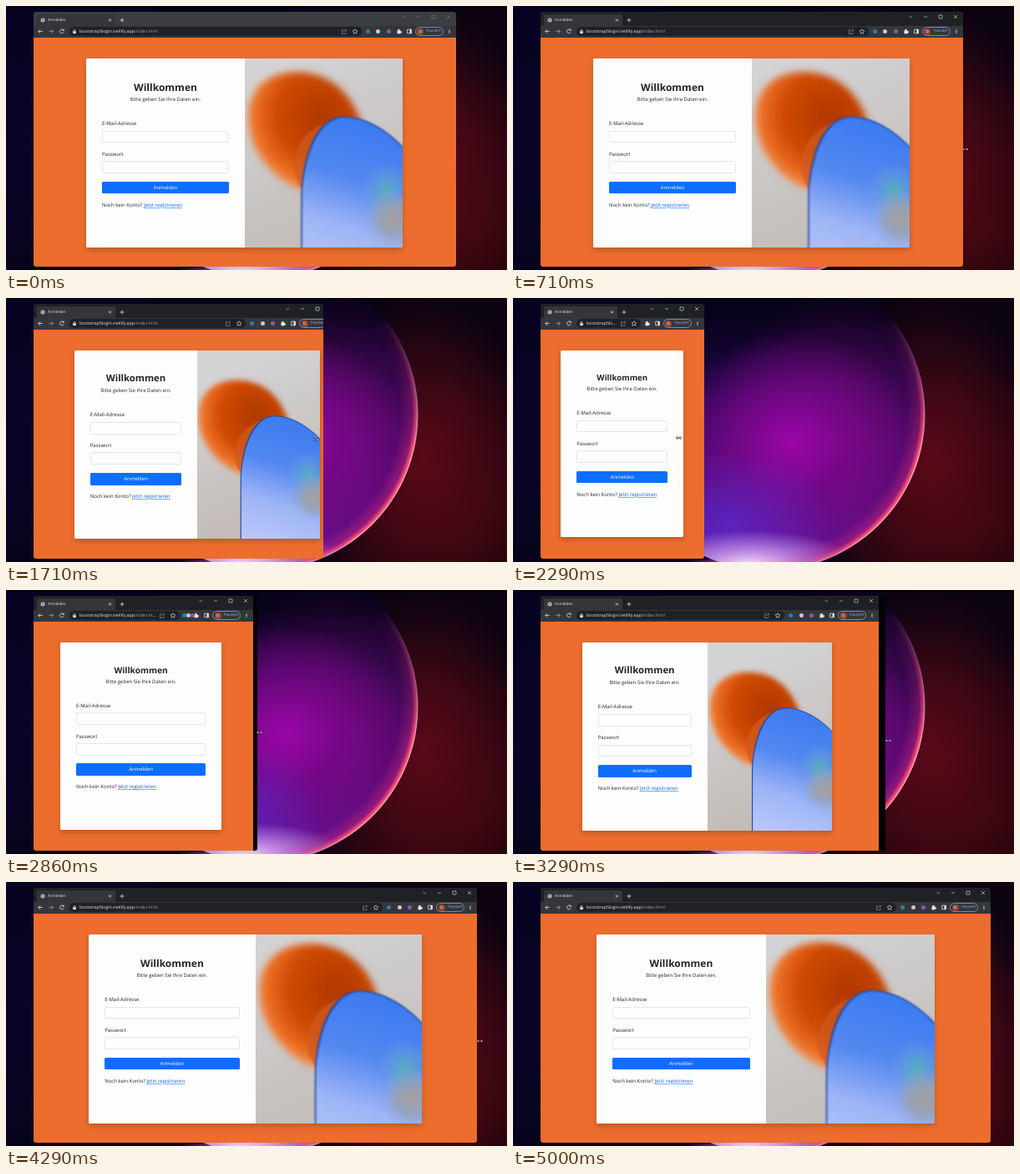
Write an HTML page that moves like this. It is 600 px wide and 317 px high and loops after 5570 ms.

```html
<!DOCTYPE html>
<html lang="de">
<head>
<meta charset="utf-8">
<title>Anmelden</title>
<style>
  /* Right edges of window frame, browser bar and page layout; pointer x */
  @property --w { syntax: "<length>"; inherits: true; initial-value: 538px; }
  @property --c { syntax: "<length>"; inherits: true; initial-value: 538px; }
  @property --p { syntax: "<length>"; inherits: true; initial-value: 538px; }
  @property --m { syntax: "<length>"; inherits: true; initial-value: 650px; }

  * { box-sizing: border-box; margin: 0; }
  html, body { width: 100%; height: 100%; overflow: hidden; }
  body {
    position: relative;
    font: 6px/9.4px "Open Sans", "Noto Sans", sans-serif;
    text-rendering: geometricPrecision;
    color: #212529;
    white-space: nowrap;
    background:
      radial-gradient(90px 9px at 292px 319px, #e9b8f5, #8a3ac0a0 65%, #3a106000),
      radial-gradient(140px 190px at 500px 190px, #6e0a1cc0, #560a16a0 45%, #2a051200 100%),
      radial-gradient(260px 190px at 560px 270px, #40060ac0, #20040800),
      linear-gradient(90deg, #08032400 40%, #0b0310 80%),
      linear-gradient(#060220, #0a0428 60%, #08031c);
    animation: resize 5570ms step-end infinite;
  }
  svg { position: absolute; overflow: visible; }
  .bar svg { fill: none; stroke: #dfe1e5; stroke-width: .8; }

  .planet, .rim {
    position: absolute; left: 120px; top: -47px;
    width: 374px; height: 374px; border-radius: 50%;
  }
  .planet {
    background:
      radial-gradient(130px 42px at 165px 368px, #fff0fff0, #d9a8f5b0 45%, #a050e000),
      radial-gradient(130px 90px at 140px 320px, #5a30dca0, #5a30dc00),
      radial-gradient(150px 130px at 215px 220px, #9a06a8, #7c078fc0 45%, #50066c00),
      radial-gradient(160px 170px at 270px 210px, #780a6cb0, #4a065000),
      linear-gradient(#060219 18%, #1c0541 38%, #42096c 62%, #6a1298);
  }
  .rim {
    background: radial-gradient(closest-side, #e0307000 88%, #e8307860 96%, #ff5078 98.6%, #ffb49a 99.4%, #ff508000);
    mask-image: radial-gradient(200px 220px at 340px 290px, #000 30%, #0000);
  }

  .win {
    position: absolute; left: 33px; top: 7px;
    width: calc(var(--w) - 33px); height: 306px;
    border-radius: 3px; overflow: hidden; background: #030205;
  }
  .bar {
    position: absolute; width: calc(var(--c) - 33px); height: 31px;
    container: bar / inline-size;
    background: #202124 linear-gradient(#0000 17px, #35363a 17px);
    color: #e8eaed;
    animation: wake 5570ms step-end infinite;
  }
  .tab {
    position: absolute; left: 4px; top: 3px;
    width: min(94px, calc(var(--c) - 141px)); height: 14px;
    padding-left: 13px; border-radius: 3px 3px 0 0;
    background: #35363a; font-size: 4.5px; line-height: 14px;
  }
  .tab svg { left: 100%; top: 0; }
  .omni {
    position: absolute; left: 43px; right: 113px; top: 18px; height: 11px;
    padding: 0 27px 0 12px; border-radius: 6px;
    background: #202124; font-size: 5.25px; line-height: 11px;
  }
  .omni p { overflow: hidden; text-overflow: ellipsis; }
  .omni i { font-style: normal; color: #9aa0a6; }
  .omni svg { left: 100%; top: 0; }
  .right { left: 100%; top: 0; }
  .caps { animation: focus 5570ms step-end infinite; }
  .ext { position: absolute; right: 78px; top: 21px; width: 30px; display: flex; justify-content: space-between; }
  .ext b { flex: none; width: 5px; height: 5px; border-radius: 50%; background: #2b83a4; }
  .ext b:nth-child(2) { background: #c9cacd; }
  .ext b:nth-child(3) { background: #9552b4; }
  .pill {
    position: absolute; right: 15px; top: 18px; width: 34px; height: 11px;
    padding-left: 13px; border: .7px solid #7389b4; border-radius: 6px;
    color: #8ab4f8; font-size: 4.5px; line-height: 9.6px;
  }
  .pill b {
    position: absolute; left: 1.6px; top: .9px; width: 8px; height: 8px;
    border-radius: 50%; background: #9c4630; color: #fff;
    font-weight: 400; line-height: 8px; text-align: center;
  }
  @container bar (max-width: 300px) {
    .omni { right: 88px; }
    .ext { right: 73px; width: 12px; }
  }
  @container bar (max-width: 225px) {
    .omni { right: 76px; }
    .ext { display: none; }
  }

  .desk { position: absolute; top: 31px; width: calc(var(--c) - 33px); height: 275px; background: #ec6d2d; }
  .page { width: calc(var(--p) - 33px); height: 275px; container: page / inline-size; }
  .card {
    position: absolute; left: 12.5cqw; top: 25px; width: 75cqw;
    display: flex; border-radius: 1.5px; overflow: hidden;
    background: #fdfdfe; box-shadow: 0 3px 6px #0003;
  }
  .form { width: 100%; padding: 27px 18.75px 45.8px; }
  h1 { font-size: min(12px, 7.95px + .864cqw); line-height: 1.25; text-align: center; margin-bottom: 3.1px; }
  .sub { text-align: center; margin-bottom: 19.6px; }
  label { display: block; margin-bottom: 3.1px; }
  .field, .btn { height: 14.84px; margin-bottom: 9.4px; border-radius: 1.6px; }
  .field { border: 1px solid #e3e6ea; }
  .btn { background: #0d6efd; color: #fff; text-align: center; line-height: 14.84px; }
  u { color: #0d5fe8; text-decoration-color: #0d6efd90; text-decoration-thickness: .5px; }
  .art { display: none; width: 50%; position: relative; overflow: hidden; }
  .art svg { width: 100%; height: 100%; overflow: hidden; }
  @container page (min-width: 387px) {
    .form { width: 50%; }
    .art { display: block; }
  }

  .mouse {
    left: calc(var(--m) - 4.5px); top: 169px; width: 9px; height: 6px;
    animation: drift 5570ms linear infinite;
  }

  @keyframes wake { 0% { background-color: #3b3d41; } 12.74%, 100% { background-color: #202124; } }
  @keyframes focus { 0% { opacity: .4; } 12.74%, 100% { opacity: 1; } }
  @keyframes drift {
    0%, 23.15% { top: 169px; }
    41.11% { top: 165px; }
    51.34% { top: 168px; }
    64.09% { top: 185px; }
    77.01%, 100% { top: 188px; }
  }
  @keyframes resize {
    0%     { --w: 538.6px; --c: 538.6px; --p: 538.6px; --m: 650px; }
    12.74% { --w: 538.6px; --c: 538.6px; --p: 538.6px; --m: 541px; }
    17.95% { --w: 538px; --c: 538px; --p: 538.6px; --m: 537px; }
    20.46% { --w: 531px; --c: 534px; --p: 538.6px; --m: 527px; }
    23.15% { --w: 515px; --c: 521px; --p: 538.6px; --m: 511px; }
    25.67% { --w: 488px; --c: 500px; --p: 510px; --m: 480px; }
    28.18% { --w: 442px; --c: 458px; --p: 480px; --m: 432px; }
    30.7%  { --w: 380px; --c: 400px; --p: 425px; --m: 370px; }
    33.39% { --w: 315px; --c: 335px; --p: 360px; --m: 305px; }
    35.9%  { --w: 262px; --c: 275px; --p: 300px; --m: 252px; }
    38.42% { --w: 230px; --c: 236px; --p: 250px; --m: 215px; }
    41.11% { --w: 228.5px; --c: 228.5px; --p: 228.5px; --m: 198px; }
    46.14% { --w: 228.5px; --c: 228.5px; --p: 228.5px; --m: 210px; }
    48.65% { --w: 246px; --c: 240px; --p: 236px; --m: 249px; }
    51.34% { --w: 301px; --c: 296px; --p: 290px; --m: 303px; }
    53.85% { --w: 350px; --c: 342px; --p: 335px; --m: 353px; }
    56.37% { --w: 400px; --c: 390px; --p: 376px; --m: 403px; }
    59.06% { --w: 446px; --c: 438px; --p: 432px; --m: 449px; }
    61.57% { --w: 489px; --c: 483px; --p: 480px; --m: 492px; }
    64.09% { --w: 519px; --c: 514.5px; --p: 514.5px; --m: 522px; }
    66.6%  { --w: 537px; --c: 533px; --p: 533px; --m: 540px; }
    69.29% { --w: 548px; --c: 545px; --p: 545px; --m: 551px; }
    71.81% { --w: 555px; --c: 553px; --p: 553px; --m: 558px; }
    74.32% { --w: 560px; --c: 559px; --p: 559px; --m: 563px; }
    77.01% { --w: 564px; --c: 564px; --p: 564px; --m: 567px; }
    79.53% { --w: 568px; --c: 567px; --p: 567px; --m: 571px; }
    82.04% { --w: 571px; --c: 570px; --p: 570px; --m: 574px; }
    84.55% { --w: 572px; --c: 571px; --p: 570px; --m: 575px; }
    89.76%, 100% { --w: 572px; --c: 572px; --p: 572px; --m: 650px; }
  }
</style>
</head>
<body>
  <div class="planet"></div>
  <div class="rim"></div>

  <div class="win">
    <div class="desk"><div class="page">
      <div class="card">
        <div class="form">
          <h1>Willkommen</h1>
          <p class="sub">Bitte geben Sie Ihre Daten ein.</p>
          <label>E-Mail-Adresse</label>
          <div class="field"></div>
          <label>Passwort</label>
          <div class="field"></div>
          <div class="btn">Anmelden</div>
          <p>Noch kein Konto? <u>Jetzt registrieren</u></p>
        </div>
        <div class="art">
          <svg viewBox="0 0 190 285" preserveAspectRatio="xMidYMid slice">
            <defs>
              <linearGradient id="wall" x2=".3" y2="1">
                <stop offset=".15" stop-color="#d3d3d6"/>
                <stop offset="1" stop-color="#c2bbb6"/>
              </linearGradient>
              <radialGradient id="ember" gradientUnits="userSpaceOnUse" cx="92" cy="98" r="92">
                <stop offset=".1" stop-color="#b43a04"/>
                <stop offset=".6" stop-color="#cf4a06"/>
                <stop offset=".85" stop-color="#ea6c20"/>
                <stop offset="1" stop-color="#f39050"/>
              </radialGradient>
              <linearGradient id="blue" x1=".6" x2=".4" y2="1">
                <stop offset="0" stop-color="#3a7af0"/>
                <stop offset=".4" stop-color="#5488f0"/>
                <stop offset=".7" stop-color="#9db4f6"/>
                <stop offset="1" stop-color="#b8c6fa"/>
              </linearGradient>
              <radialGradient id="teal">
                <stop offset="0" stop-color="#55aebc"/>
                <stop offset="1" stop-color="#6f9ee0" stop-opacity="0"/>
              </radialGradient>
              <radialGradient id="mist">
                <stop offset="0" stop-color="#a69f9e"/>
                <stop offset=".5" stop-color="#98a2ae" stop-opacity=".8"/>
                <stop offset="1" stop-color="#8fa8d8" stop-opacity="0"/>
              </radialGradient>
              <filter id="soft" x="-20%" y="-20%" width="140%" height="140%"><feGaussianBlur stdDeviation="4"/></filter>
              <filter id="edge"><feGaussianBlur stdDeviation="1"/></filter>
            </defs>
            <path fill="url(#wall)" d="M0 0H190V285H0Z"/>
            <path fill="url(#ember)" filter="url(#soft)" d="M4 98C4 66 27 45 62 45C98 45 126 66 139 104L104 130 70 188C46 180 4 150 4 98Z"/>
            <path fill="#d05a20" opacity=".7" filter="url(#edge)" d="M60 150C64 118 96 100 136 99L100 128 70 187Q56 172 60 150Z"/>
            <path fill="#2c4c9c" filter="url(#edge)" d="M67.500 290V190C69.500 150 83 100 118 98.500C146 98.500 172 115.500 192 137.500V290Z"/>
            <path fill="url(#blue)" filter="url(#edge)" d="M69 290V190C71 152 86 102 118 100C146 100 172 117 192 139V290Z"/>
            <ellipse fill="url(#teal)" cx="170" cy="188" rx="32" ry="34"/>
            <ellipse fill="url(#mist)" cx="178" cy="222" rx="36" ry="36"/>
          </svg>
        </div>
      </div>
    </div></div>

    <div class="bar">
      <div class="tab">Anmelden
        <svg width="1" height="1">
          <path d="M-8 5.5l3 3m0-3l-3 3M5.5 7h5M8 4.5v5"/>
        </svg>
      </div>
      <div class="omni">
        <p>bootstrap5login.netlify.app<i>/index.html</i></p>
        <svg width="1" height="1" style="stroke-width:.6">
          <path stroke="#9a9da1" d="M-22 3.5h-1.5v5h4.500v-2M-22 6.500q.5-2.500 3.500-2.500m-1.300-1.300l1.500 1.300-1.500 1.400"/>
          <path d="M-8 2.700l.9 1.900 2.100.2-1.600 1.400.5 2.100-1.900-1.100-1.900 1.100.5-2.100-1.600-1.400 2.100-.2z"/>
        </svg>
      </div>
      <svg width="1" height="1" style="left:0;top:0">
        <circle cx="11" cy="10" r="2.500" fill="#b9bcc2" stroke="none"/>
        <path d="M9.500 9l2 .5-.5 2" stroke="#35363a" stroke-width=".6"/>
        <path d="M10.800 23.500H5.800m2.300-2.300l-2.300 2.300 2.300 2.300"/>
        <path stroke="#9a9da1" d="M18.500 23.500h5m-2.300-2.300l2.300 2.300-2.300 2.300"/>
        <path d="M36 22a2.400 2.400 0 1 0 .2 2.400M36.300 20.700v1.800h-1.800"/>
        <path d="M47.300 23.300h3.400v2.600h-3.400z" fill="#dfe1e5" stroke-width=".3"/>
        <path d="M48 23.300v-1a1 1 0 0 1 2 0v1" stroke-width=".6"/>
      </svg>
      <svg class="right caps" width="1" height="1">
        <path d="M-64.500 5.200l1.800 1.700 1.800-1.700M-47 6h4M-29 4h4v4h-4zM-11 4l4 4m0-4l-4 4" stroke-width=".6"/>
      </svg>
      <svg class="right" width="1" height="1">
        <path d="M-70.500 22.300h4v4h-4z" fill="#e8eaed" stroke="none"/>
        <circle cx="-68.500" cy="21.800" r="1.100" fill="#e8eaed" stroke="none"/>
        <circle cx="-66" cy="24.300" r="1.100" fill="#e8eaed" stroke="none"/>
        <path d="M-58.300 21.200h4.800v4.600h-4.800z"/>
        <path d="M-55.500 21.200h2v4.600h-2z" fill="#e8eaed" stroke="none"/>
        <path d="M-8 21.500v4.200" stroke-width="1.200" stroke-dasharray="1.100 .5"/>
      </svg>
      <div class="ext"><b></b><b></b><b></b></div>
      <div class="pill"><b>D</b>Pausiert</div>
    </div>
  </div>

  <svg class="mouse" viewBox="0 0 9 6" stroke-linejoin="round">
    <path d="M.8 3l2-1.800v1.300h3.400v-1.300l2 1.800-2 1.800v-1.300h-3.400v1.300z" fill="#fff" stroke="#000" stroke-width=".5"/>
  </svg>
</body>
</html>
```
